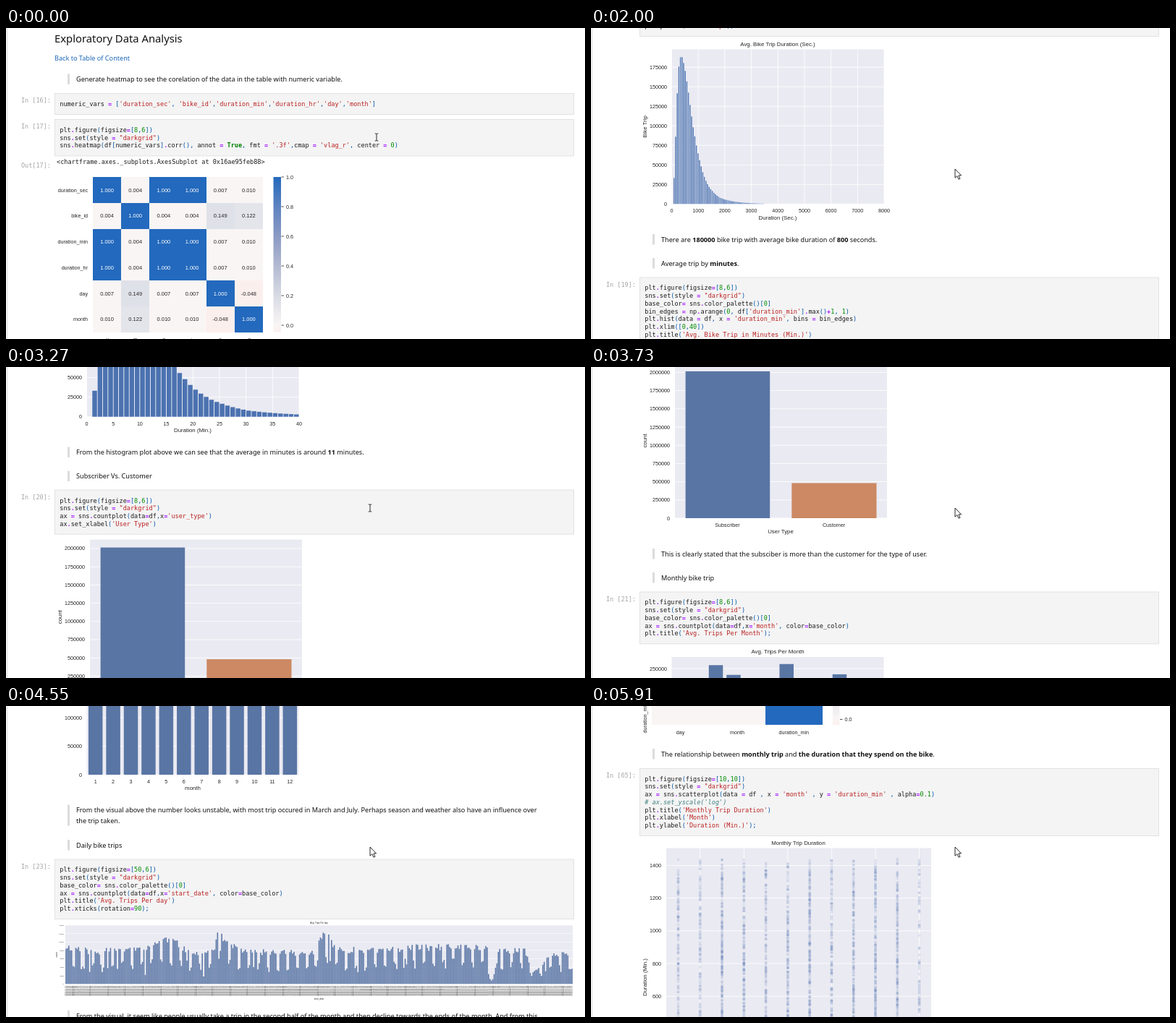
These frames come from a looping animation (800 by 430 pixels, 6000 ms). An HTML page:

```html
<!DOCTYPE html>
<html lang="en">
<head>
<meta charset="utf-8">
<title>Notebook scroll</title>
<style>
  html, body { margin: 0; width: 100%; height: 100%; overflow: hidden; background: #fff; }
  svg { display: block; width: 800px; height: 430px; }
  text { white-space: pre; }
  .prose { font-family: "Noto Sans", "Open Sans", sans-serif; fill: #111; }
  .code { font-family: "DejaVu Sans Mono", "Noto Sans Mono", monospace; fill: #1c1c1c; }
  .plot { font-family: "Liberation Sans", Arial, sans-serif; fill: #262626; }
</style>
</head>
<body>
<svg id="stage" viewBox="0 0 800 430"></svg>
<script>
const NS = 'http://www.w3.org/2000/svg';
const BLUE = '#4c72b0', MUTED = '#5975a4', PANEL = '#eaeaf2';
const CODE = 8.54, PROSE = 9.13, TICK = 7.2, LABEL = 7.87, LINE = 10.7;

function el(tag, attrs, parent) {
  const node = document.createElementNS(NS, tag);
  for (const k in attrs) node.setAttribute(k, attrs[k]);
  parent.appendChild(node);
  return node;
}
const stage = document.getElementById('stage');
const doc = el('g', {}, stage);
const cells = [];
let base = 0; // document position the current section is measured from

function rect(x, y, w, h, fill, extra) {
  return el('rect', { x, y: y + base, width: w, height: h, fill, ...extra }, doc);
}
function hline(x1, x2, y, color = '#fff', w = 0.8) { rect(x1, y - w / 2, x2 - x1, w, color); }
function vline(x, y1, y2, color = '#fff', w = 0.8) { rect(x - w / 2, y1, w, y2 - y1, color); }

// y is the optical middle of the line
function text(str, x, y, cls, size, extra = {}) {
  const node = el('text', { x, y: y + base + size * 0.35, class: cls, 'font-size': size, ...extra }, doc);
  node.textContent = str;
  return node;
}
function plotText(str, x, y, size = TICK, anchor = 'middle', extra = {}) {
  return text(str, x, y, 'plot', size, { 'text-anchor': anchor, ...extra });
}
function upText(str, x, y, size = TICK, anchor = 'middle', opacity = 1) {
  const node = el('text', { class: 'plot', 'font-size': size, 'text-anchor': anchor, 'fill-opacity': opacity,
    transform: `translate(${x + size * 0.35} ${y + base}) rotate(-90)` }, doc);
  node.textContent = str;
}
function span(parent, str, attrs) { el('tspan', attrs, parent).textContent = str; }

function prose(str, x, y, size = PROSE, extra) {
  const node = text('', x, y, 'prose', size, extra);
  str.split('**').forEach((part, i) => span(node, part, i % 2 ? { 'font-weight': 700 } : {}));
}
function quote(y, ...lines) {
  rect(85, y - 7.5, 3, 14.5 * lines.length, '#dcdcdc');
  lines.forEach((s, i) => prose(s, 97, y + i * 14.5));
}

const TOKEN = /('[^']*'|"[^"]*")|(#.*)|\b(True)\b|\b(\d+(?:\.\d+)?)\b|([=+*.])|([()[\],;]+)/g;
const STYLES = [
  { fill: '#ba2121' }, { fill: '#408080', 'font-style': 'italic' },
  { fill: '#008000', 'font-weight': 700 }, { fill: '#008800' },
  { fill: '#a2f', 'font-weight': 700 }, { fill: '#05a' }
];
function codeLine(str, x, y) {
  const node = text('', x, y, 'code', CODE);
  let at = 0;
  for (const m of str.matchAll(TOKEN)) {
    span(node, str.slice(at, m.index), {});
    span(node, m[0], STYLES[m.slice(1).findIndex(g => g !== undefined)]);
    at = m.index + m[0].length;
  }
  span(node, str.slice(at), {});
}
function prompt(str, y) {
  text(str, 62, y, 'code', CODE, { 'text-anchor': 'end', style: 'fill:#a6a6a6' });
}
function cell(n, top, src) {
  const lines = src.trim().split('\n');
  const h = 29 + (lines.length - 1) * LINE;
  rect(67.5, top, 717, h, '#f4f4f4', { stroke: '#dcdcdc', 'stroke-width': 0.8 });
  cells.push([top + base, top + base + h]);
  prompt(`In [${n}]:`, top + 9.6);
  lines.forEach((s, i) => codeLine(s, 74.3, top + 14.5 + i * LINE));
}

function seeded(seed) {
  return () => {
    seed = (seed * 1664525 + 1013904223) % 4294967296;
    return seed / 4294967296;
  };
}
function lerpAt(points, x) {
  let i = 1;
  while (i < points.length - 1 && points[i][0] < x) i++;
  const [x0, y0] = points[i - 1], [x1, y1] = points[i];
  const p = Math.min(1, Math.max(0, (x - x0) / (x1 - x0)));
  return y0 + (y1 - y0) * p;
}

// panel with horizontal grid and tick labels counted upwards from the bottom
function axes(x1, x2, top, bottom, step, unit, labelX) {
  rect(x1, top, x2 - x1, bottom - top, PANEL);
  for (let i = 0; bottom - i * step > top; i++) {
    hline(x1, x2, bottom - i * step);
    plotText(i * unit, labelX, bottom - i * step, TICK, 'end');
  }
}

// ---- correlation heatmaps
const grad = el('linearGradient', { id: 'scale', x1: 0, y1: 0, x2: 0, y2: 1 }, el('defs', {}, stage));
[[0, '#2369bd'], [.19, '#5e83c0'], [.38, '#8b9ac4'], [.57, '#b2b9d1'], [.76, '#d7dae4'],
 [.955, '#f9f5f5'], [1, '#fbf0ee']]
  .forEach(([offset, color]) => el('stop', { offset, 'stop-color': color }, grad));

function shade(v) {
  if (v > 0.9) return '#2369bd';
  if (v < -0.02) return '#fbefed';
  if (v > 0.13) return '#dfe1e8';
  return v > 0.1 ? '#e4e5eb' : '#f9f5f4';
}
function heatmap(x, y, w, h, names, value) {
  const n = names.length, cw = w / n, ch = h / n;
  for (let r = 0; r < n; r++) for (let c = 0; c < n; c++) {
    const v = value(r, c);
    rect(x + c * cw, y + r * ch, cw, ch, shade(v), { 'shape-rendering': 'crispEdges' });
    plotText(v.toFixed(3), x + (c + .5) * cw, y + (r + .5) * ch, 7.5, 'middle',
      v > 0.9 ? { style: 'fill:#fff' } : {});
  }
}
function colorbar(x, top, w, h, zeroY, unit) {
  rect(x, top, w, h, 'url(#scale)');
  for (let i = 0; i < 6; i++) {
    const y = zeroY - i * unit;
    hline(x + w + 0.5, x + w + 4, y, '#262626');
    plotText((i / 5).toFixed(1), x + w + 7, y, TICK, 'start');
  }
}

prose('Exploratory Data Analysis', 67, 15, 14.8);
prose('Back to Table of Content', 67, 42, PROSE, { style: 'fill:#1a66b8' });
quote(71, 'Generate heatmap to see the corelation of the data in the table with numeric variable.');
cell(16, 90.5, "numeric_vars = ['duration_sec', 'bike_id','duration_min','duration_hr','day','month']");
cell(17, 126.5, `
plt.figure(figsize=[8,6])
sns.set(style = "darkgrid")
sns.heatmap(df[numeric_vars].corr(), annot = True, fmt = '.3f',cmap = 'vlag_r', center = 0)`);
prompt('Out[17]:', 190);
text('<chartframe.axes._subplots.AxesSubplot at 0x16ae95feb88>', 70, 185, 'code', CODE);

const vars = ['duration_sec', 'bike_id', 'duration_min', 'duration_hr', 'day', 'month'];
const pairs = { '1,4': .149, '1,5': .122, '4,5': -.048 };
heatmap(120, 206, 235, 214.5, vars, (r, c) => {
  const a = Math.min(r, c), b = Math.max(r, c);
  if (a === b) return 1;
  if (pairs[[a, b]]) return pairs[[a, b]];
  if (b === 4) return .007;
  if (b === 5) return .010;
  return a === 1 || b === 1 ? .004 : 1;
});
vars.forEach((name, i) => {
  plotText(name, 113, 224 + i * 35.75, TICK, 'end');
  upText(name, 139.6 + i * 39.17, 429, TICK, 'end');
});
colorbar(369.5, 206, 10.5, 214.5, 411, 41);

// ---- duration histograms, one value per minute
base = 282;
prose('Univariate Exploration', 67, 212, 11.85);
quote(241, 'Average trip by **seconds**.');
cell(18, 260.5, `
plt.figure(figsize=[8,6])
sns.set(style = "darkgrid")
base_color= sns.color_palette()[0]
bin_edges = np.arange(0, df['duration_sec'].max() + 100 , 60)
ax = plt.hist(data = df , x = 'duration_sec' , bins = bin_edges, color=base_color)
plt.xlim(0,8000)
plt.title('Avg. Bike Trip Duration (Sec.)')
plt.xlabel('Duration (Sec.)')
plt.ylabel('Bike Trip');`);

const rise = [0, 36, 93, 153, 190, 203, 203, 195, 184, 169.5, 154, 137, 121, 106, 93.5, 81, 70,
  60.5, 52, 44, 37.5, 32, 27.5, 23.5, 20.5];
function minuteHeight(i) {
  if (i < rise.length) return rise[i];
  return i < 30 ? 18 * 0.861 ** (i - 25) : 8.5 * 0.9 ** (i - 30);
}
function histogram(top, title, label, unit, bins, barW, gap) {
  const x0 = 111.5, bottom = top + 213.8, step = 36.69;
  axes(x0, 405, top, bottom, 27.03, 25000, 105);
  for (let i = 0; i <= 8; i++) {
    vline(x0 + i * step, top, bottom);
    plotText(i * unit, x0 + i * step, bottom + 9.3);
  }
  for (let i = 1; i < bins; i++) {
    const h = minuteHeight(i);
    rect(x0 + i * barW, bottom - h, barW, h, '#fff');
    rect(x0 + i * barW + gap / 2, bottom - h, barW - gap, h, BLUE);
  }
  plotText(title, 258, top - 7.5, LABEL);
  plotText(label, 258, bottom + 18.5, LABEL);
  upText('Bike Trip', 74, top + 107, LABEL);
}

base = 645.5;
histogram(29.5, 'Avg. Bike Trip Duration (Sec.)', 'Duration (Sec.)', 1000, 58, 2.2, 0.7);
quote(292.5, 'There are **180000** bike trip with average bike duration of **800** seconds.');
quote(325.5, 'Average trip by **minutes**.');
cell(19, 345, `
plt.figure(figsize=[8,6])
sns.set(style = "darkgrid")
base_color= sns.color_palette()[0]
bin_edges = np.arange(0, df['duration_min'].max()+1, 1)
plt.hist(data = df, x = 'duration_min', bins = bin_edges)
plt.xlim([0,40])
plt.title('Avg. Bike Trip in Minutes (Min.)')
plt.xlabel('Duration (Min.)')
plt.ylabel('Bike Trip');`);

base = 1057;
histogram(65.4, 'Avg. Bike Trip in Minutes (Min.)', 'Duration (Min.)', 5, 40, 7.337, 0.8);
quote(328.5, 'From the histogram plot above we can see that the average in minutes is around **11** minutes.');
quote(361.5, 'Subscriber Vs. Customer');
cell(20, 380.5, `
plt.figure(figsize=[8,6])
sns.set(style = "darkgrid")
ax = sns.countplot(data=df,x='user_type')
ax.set_xlabel('User Type')`);

// ---- count plots
base = 1511;
axes(116, 409, -5, 209, 25.2, 250000, 109);
rect(130.6, 6, 116.6, 203, MUTED);
rect(277.3, 160.5, 117.2, 48.5, '#cc8963');
plotText('Subscriber', 188.5, 218);
plotText('Customer', 335.5, 218);
plotText('User Type', 262, 227, LABEL);
upText('count', 74.5, 102, LABEL);
quote(258.5, 'This is clearly stated that the subsciber is more than the customer for the type of user.');
quote(291.5, 'Monthly bike trip');
cell(21, 311, `
plt.figure(figsize=[8,6])
sns.set(style = "darkgrid")
base_color= sns.color_palette()[0]
ax = sns.countplot(data=df,x='month', color=base_color)
plt.title('Avg. Trips Per Month');`);

base = 2030.5;
plotText('Avg. Trips Per Month', 258, -126, LABEL);
axes(111.5, 404.5, -118.5, 95, 39.5, 50000, 105);
[190, 181, 256, 239, 214, 212, 258, 229, 216, 240, 203, 186].forEach((v, i) => {
  const x = 111.5 + (i + .1) * 24.42, h = v * 0.79;
  rect(x, 95 - h, 19.5, h, MUTED);
  plotText(i + 1, x + 9.75, 104);
});
plotText('month', 258, 113.5, LABEL);
upText('count', 74.5, -12, LABEL);
quote(144, 'From the visual above the number looks unstable, with most trip occured in March and July. Perhaps season and weather also have an influence over', 'the trip taken.');
quote(192.5, 'Daily bike trips');
cell(23, 212, `
plt.figure(figsize=[50,6])
sns.set(style = "darkgrid")
base_color= sns.color_palette()[0]
ax = sns.countplot(data=df,x='start_date', color=base_color)
plt.title('Avg. Trips Per day')
plt.xticks(rotation=90);`);

plotText('Avg. Trips Per day', 432.5, 300, 3);
rect(82, 303, 701, 81.3, PANEL);
for (let i = 0; i < 8; i++) {
  hline(82, 783, 384.3 - i * 11.6, '#fff', 0.5);
  plotText(i * 2000, 80, 384.3 - i * 11.6, 2.5, 'end');
}
const season = [[82, 55], [100, 53], [120, 46], [131, 46], [150, 54], [180, 52], [200, 57], [216, 67],
  [232, 62], [245, 52], [270, 44], [286, 50], [292, 74], [300, 66], [310, 62], [320, 48], [400, 46],
  [428, 46], [432, 66], [443, 78], [450, 58], [460, 51], [510, 49], [560, 54], [622, 55], [664, 54],
  [667, 10], [674, 14], [680, 48], [715, 51], [727, 16], [740, 30], [752, 42], [778, 45], [783, 6]];
const dayRnd = seeded(11), DAY = 701 / 365;
for (let d = 0; d < 365; d++) {
  const x = 82 + d * DAY, weekend = d % 7 > 4;
  let h = lerpAt(season, x) * (0.84 + 0.18 * dayRnd());
  if (weekend) h *= 0.4 + 0.25 * dayRnd();
  else if (dayRnd() < 0.07) h *= 0.25 + 0.5 * dayRnd();
  rect(x + 0.2, 384.3 - h, DAY * 0.8, h, MUTED);
  upText(new Date(Date.UTC(2018, 0, 1 + d)).toISOString().slice(0, 10), x + DAY / 2, 387, 2.7, 'end', 0.75);
}
plotText('start_date', 432.5, 404.5, 3);
upText('count', 70, 344, 3);
quote(428.5, 'From the visual, it seem like people usually take a trip in the second half of the month and then decline towards the ends of the month. And from this',
  'plot we can see how the trips change from day to day.');

// ---- relationship section
base = 2783.5;
quote(-276.5, 'The relationship of the **numeric variables**.');
cell(64, -257, `
plt.figure(figsize=[8,6])
sns.set(style = "darkgrid")
num_vars = ['day','month','duration_min']
sns.heatmap(df[num_vars].corr(), annot = True, fmt = '.3f',cmap = 'vlag_r', center = 0)`);
const few = ['day', 'month', 'duration_min'];
heatmap(84, -188, 236, 214.3, few, (r, c) => r === c ? 1 : r + c === 1 ? -.048 : r + c === 2 ? .007 : .010);
few.forEach((name, i) => plotText(name, 123.5 + i * 78.4, 36.5));
upText('day', 74.5, -152);
upText('month', 74.5, -80);
upText('duration_min', 74.5, 37.5, TICK, 'start');
colorbar(334, -188, 9.5, 214.3, 18.5, 41);
quote(66.5, 'The relationship between **monthly trip** and **the duration that they spend on the bike**.');
cell(65, 86.3, `
plt.figure(figsize=[10,10])
sns.set(style = "darkgrid")
ax = sns.scatterplot(data = df , x = 'month' , y = 'duration_min' , alpha=0.1)
# ax.set_yscale('log')
plt.title('Monthly Trip Duration')
plt.xlabel('Month')
plt.ylabel('Duration (Min.)');`);
plotText('Monthly Trip Duration', 286.5, 189, LABEL);
rect(104, 196.5, 366, 260, PANEL);
for (let i = 0; i < 5; i++) {
  hline(104, 470, 220.5 + i * 45.2);
  plotText(1400 - i * 200, 97, 220.5 + i * 45.2, TICK, 'end');
}
for (let i = 0; i < 6; i++) vline(150.8 + i * 60.55, 196.5, 456);
upText('Duration (Min.)', 74, 375, LABEL);
const dotRnd = seeded(5);
[120, 125, 225, 205, 140, 185, 225, 160, 185, 225, 190, 85].forEach((count, m) => {
  for (let i = 0; i < count; i++) {
    el('circle', { cx: 120.5 + m * 30.28, cy: base + 211 + 235 * dotRnd() ** 0.85, r: 1.95,
      fill: BLUE, 'fill-opacity': 0.125, stroke: '#fff', 'stroke-width': 0.3, 'stroke-opacity': 0.15 }, doc);
  }
});

// ---- fixed overlay: page edge and pointer
el('rect', { x: 1, y: 0, width: 1, height: 430, fill: '#dedede' }, stage);
const arrow = el('path', { d: 'M0 0V12.2L2.9 9.6L5 14.2L6.9 13.3L4.9 8.9H8.6Z',
  fill: '#fff', stroke: '#111', 'stroke-width': 0.9 }, stage);
const beam = el('path', { d: 'M-2.2 -5H-.5L0 -4.5L.5 -5H2.2M0 -4.5V4.5M-2.2 5H-.5L0 4.5L.5 5H2.2',
  fill: 'none', stroke: '#111', 'stroke-width': 0.9 }, stage);

// keys are [tick, value] with 11 ticks per second
const scrollKeys = [[6, 0], [11, 282], [12, 282], [18, 555], [20, 555], [22, 645.5], [24, 770], [25, 770],
  [27, 910], [28, 910], [30, 1057], [31, 1057], [33, 1170], [34, 1170], [41, 1511], [46, 1836],
  [47, 1836], [50, 2030.5], [52, 2160], [54, 2160], [58, 2440], [61, 2440], [65, 2783.5]];
const xKeys = [[0, 512], [1, 508], [2, 500], [3, 494], [4, 491], [6, 491], [11, 496], [12, 496], [18, 503]];
const yKeys = [[0, 151], [1, 160], [2, 178], [3, 193], [4, 199], [6, 199], [11, 196], [12, 196], [18, 195]];

function draw(ms) {
  const tick = Math.floor(((ms % 6000) + 5) * 11 / 1000) % 66;
  const scroll = lerpAt(scrollKeys, tick);
  const x = lerpAt(xKeys, tick), y = lerpAt(yKeys, tick);
  doc.setAttribute('transform', `translate(0 ${-scroll})`);
  const typing = cells.some(([a, b]) => y + scroll > a && y + scroll < b);
  const pointer = typing ? beam : arrow;
  arrow.style.display = typing ? 'none' : '';
  beam.style.display = typing ? '' : 'none';
  pointer.setAttribute('transform', `translate(${x} ${y})`);
}
const start = performance.now();
function loop() {
  draw(performance.now() - start);
  requestAnimationFrame(loop);
}
draw(0);
requestAnimationFrame(loop);
</script>
</body>
</html>
```
